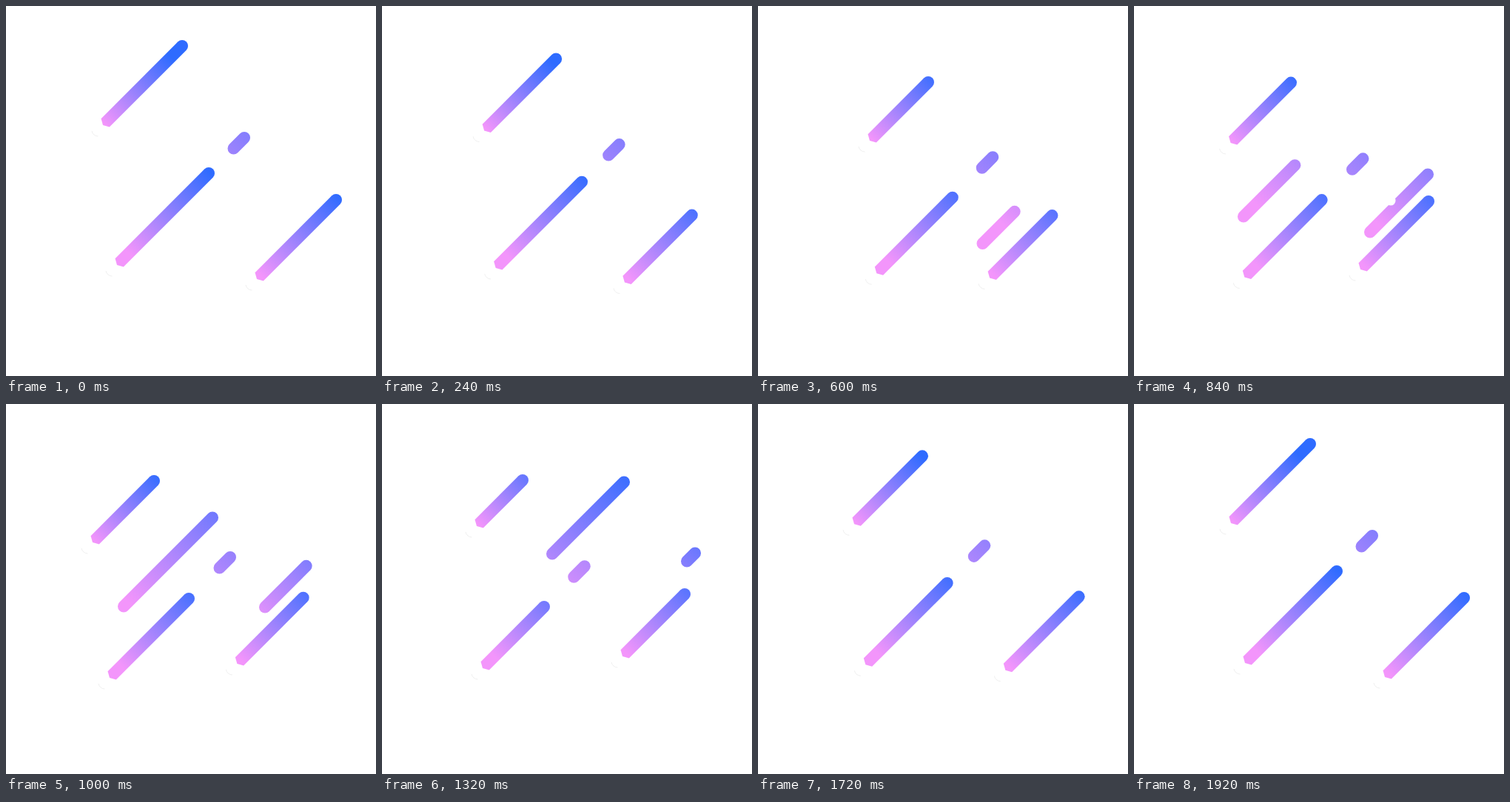
Recreate the animation shown at these times as an HTML page with a canvas. Size 500 by 500 pixels, loop 2 s.

```html
<!DOCTYPE html>
<html>
<head>
<meta charset="utf-8">
<style>
html, body { margin: 0; width: 100%; height: 100%; overflow: hidden; background: #fff; }
canvas { display: block; }
</style>
</head>
<body>
<canvas id="stage" width="500" height="500"></canvas>
<script>
const ctx = document.getElementById('stage').getContext('2d');
const LOOP = 2000, STEP = 40, END = 1920, R = 8;
const PINK = '#f395fb', BLUE = '#2e6bff';

// Everything lies on diagonals x + y = sum.
// Bar turning points: time, sum, upper x, lower x; each bar returns to its first pose.
const bars = [
  { fade: [2, 92], keys: [
    [40, 292, 238, 131], [600, 333, 230, 151], [1000, 304, 200, 117], [1320, 293, 190, 128]] },
  { fade: [16, 126], keys: [
    [40, 500, 274, 150], [640, 523, 262, 161], [1000, 510, 247, 140], [1320, 493, 219, 136]] },
  { fade: [5, 112], keys: [
    [40, 708, 446, 339], [400, 696, 397, 319], [840, 662, 398, 306], [1320, 666, 409, 325]] }
];
bars.forEach(({ keys }) => keys.push([END, ...keys[0].slice(1)]));

// A streak's head runs ahead of its tail: time, x.
const streaks = [
  { sum: 432.5, fade: [165, 345],
    head: [[660, 148], [1000, 279], [1320, 327], [1620, 339]],
    tail: [[840, 148], [1000, 159], [1320, 230], [1620, 339]] },
  { sum: 624.5, fade: [330, 470],
    head: [[320, 288], [840, 397], [1560, 436]],
    tail: [[360, 288], [840, 319], [1320, 412], [1560, 436]] }
];

function at(keys, t) {
  if (t <= keys[0][0]) return keys[0].slice(1);
  const i = keys.findIndex(k => k[0] >= t);
  const a = keys[i - 1], b = keys[i];
  const u = (t - a[0]) / (b[0] - a[0]);
  return a.slice(1).map((v, n) => v + (b[n + 1] - v) * u);
}

function shade(sum, from, to) {
  const g = ctx.createLinearGradient(from, sum - from, to, sum - to);
  g.addColorStop(0, PINK);
  g.addColorStop(1, BLUE);
  return g;
}

function capsule(sum, head, tail, fade) {
  ctx.strokeStyle = shade(sum, ...fade);
  ctx.lineWidth = 2 * R;
  ctx.lineCap = 'round';
  ctx.beginPath();
  ctx.moveTo(tail, sum - tail);
  ctx.lineTo(head + 0.01, sum - head - 0.01);
  ctx.stroke();
}

function bar({ keys, fade }, t) {
  const [sum, x, tip] = at(keys, t), low = sum - tip;
  ctx.fillStyle = shade(sum, tip + fade[0], tip + fade[1]);
  ctx.beginPath();
  ctx.arc(x, sum - x, R, -Math.PI * 3 / 4, Math.PI / 4);
  ctx.lineTo(tip + 8.8, low + 2.5);
  ctx.lineTo(tip, low);
  ctx.lineTo(tip - 2.5, low - 8.8);
  ctx.fill();

  // faint rim of the white end cap
  ctx.strokeStyle = '#e4e4e4';
  ctx.lineWidth = 0.6;
  ctx.beginPath();
  ctx.arc(tip - 7, low + 7, R, Math.PI * 0.5, Math.PI * 0.95);
  ctx.stroke();
}

function streak({ sum, fade, head, tail }, t) {
  if (t < head[0][0] || t >= head[head.length - 1][0]) return;
  capsule(sum, at(head, t)[0], at(tail, t)[0], fade);
}

// The pill floats above the upper end of the middle bar.
function pill(t) {
  const [sum, x] = at(bars[1].keys, t);
  const head = x + 48 + 8 * Math.sin(Math.PI * (t - STEP) / (END - STEP));
  capsule(sum, head, head - 14.5, [215, 415]);
}

// A white dot rises and shows only where it crosses a streak.
function dot(t) {
  ctx.fillStyle = '#fff';
  ctx.beginPath();
  ctx.arc(347, 463 - 0.238 * t, 6.5, 0, Math.PI * 2);
  ctx.fill();
}

function draw(now) {
  const step = Math.floor(now % LOOP / STEP) * STEP;
  const t = Math.min(END, Math.max(STEP, step));
  ctx.fillStyle = '#fff';
  ctx.fillRect(0, 0, 500, 500);
  streaks.forEach(s => streak(s, t));
  dot(t);
  bars.forEach(b => bar(b, t));
  pill(t);
}

const begin = performance.now();
function tick() {
  draw(performance.now() - begin);
  requestAnimationFrame(tick);
}
tick();
</script>
</body>
</html>
```
